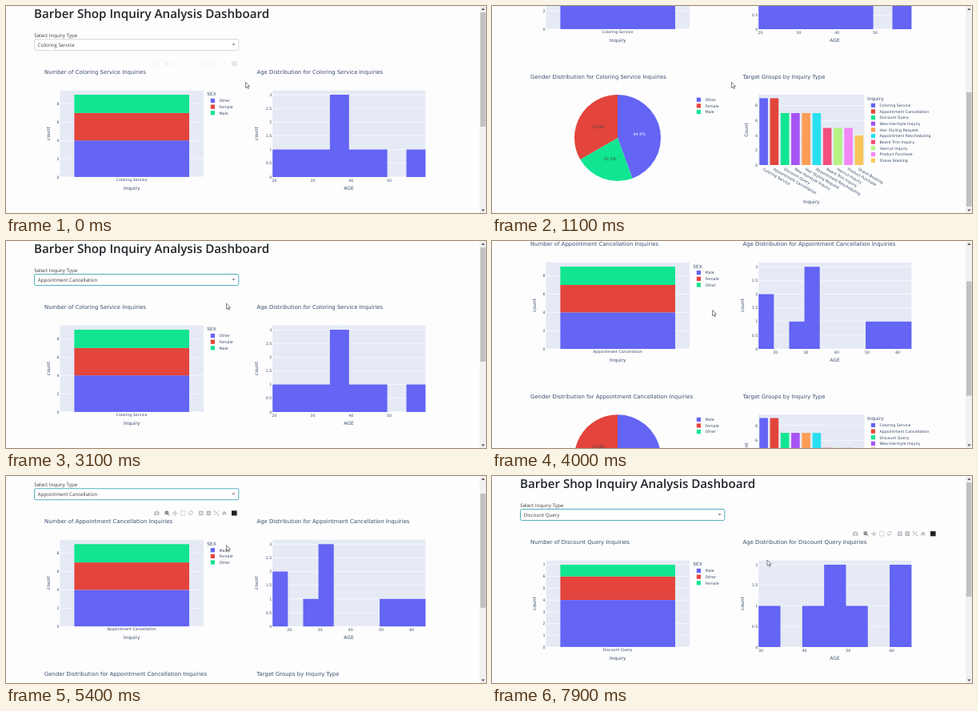
An HTML page that plays this animation: 600x259 px, repeating every 8 s.

```html
<!DOCTYPE html>
<html lang="en">
<head>
<meta charset="utf-8">
<title>Inquiry dashboard</title>
<style>
html, body { margin: 0; width: 100%; height: 100%; overflow: hidden; background: #fdfdfe; }
svg { display: block; width: 600px; height: 259px; text-rendering: geometricPrecision; }
.ui { font-family: "Open Sans", "Noto Sans", sans-serif; font-size: 6.15px; fill: #3c3c3c; }
.plot { font-family: "DejaVu Sans", sans-serif; fill: #3a4d6b; }
</style>
</head>
<body>
<svg id="stage" viewBox="0 0 600 259"></svg>
<script>
const LOOP = 8000;
const COLORS = ['#6464f5', '#e3443b', '#11e591', '#a553f5', '#fc9d57',
  '#29e0ef', '#f2507c', '#b5f383', '#f286f5', '#f8c657'];
const BACK = '#e5eaf5';
const TICK = 4.75, AXIS = 5.95, TITLE = 6.9;
const BOTTOM = 213.9, FULL = 102.9;

const DATA = [
  { name: 'Coloring Service', sexes: ['Other', 'Female', 'Male'], counts: [4, 3, 2], step: 2,
    bins: [1, 1, 1, 3, 1, 1, 0, 1], start: 19.5, ages: [20, 30, 40, 50] },
  { name: 'Appointment Cancellation', sexes: ['Male', 'Female', 'Other'], counts: [4, 3, 2], step: 2,
    bins: [2, 0, 1, 3, 0, 0, 0, 1, 1, 1], start: 14.5, ages: [20, 30, 40, 50, 60] },
  { name: 'Discount Query', sexes: ['Male', 'Other', 'Female'], counts: [4, 2, 1], step: 1,
    bins: [1, 0, 1, 2, 1, 0, 2], start: 29.5, ages: [30, 40, 50, 60] }
];
const GROUPS = [['Coloring Service', 9], ['Appointment Cancellation', 9], ['Discount Query', 7],
  ['New Hairstyle Inquiry', 7], ['Hair Styling Request', 7], ['Appointment Rescheduling', 7],
  ['Beard Trim Inquiry', 5], ['Haircut Inquiry', 5], ['Product Purchase', 5], ['Shave Booking', 4]];
const OPTIONS = ['Coloring Service', 'Appointment Cancellation', 'Discount Query',
  'Shave Booking', 'New Hairstyle Inquiry', 'Beard Trim Inquiry'];
const ROW = 14.1, MENU_TOP = 55.6;

const rect = (x, y, w, h, fill, more = '') =>
  `<rect x="${x}" y="${y}" width="${w}" height="${h}" fill="${fill}" ${more}/>`;
const path = (d, fill, more = '') => `<path d="${d}" fill="${fill}" ${more}/>`;
const text = (x, y, str, size, anchor = 'start', more = '') =>
  `<text x="${x}" y="${y}" font-size="${size}" text-anchor="${anchor}" ${more}>${str}</text>`;
const upright = (x, y, str) =>
  text(0, 0, str, AXIS, 'middle', `transform="translate(${x} ${y}) rotate(-90)"`);
const sum = list => list.reduce((a, b) => a + b, 0);

// Plot background with horizontal grid and value labels
function yAxis(x, w, bottom, h, top, step, unit) {
  let out = rect(x, bottom - h, w, h, BACK);
  for (let v = 0; v <= top; v += step) {
    const y = bottom - v * unit;
    out += rect(x, y - 0.3, w, 0.6, '#fff') + text(x - 1, y + 1.7, v, TICK, 'end');
  }
  return out;
}

function legend(x, y, labels, pitch = 7.65) {
  return labels.map((label, i) =>
    rect(x, y + i * pitch - 2.6, 5.2, 5.2, COLORS[i]) +
    text(x + 10.7, y + i * pitch + 1.8, label, TICK)).join('');
}

function countChart({ name, sexes, counts, step }) {
  const total = sum(counts), unit = FULL / total;
  let out = text(48, 85.2, `Number of ${name} Inquiries`, TITLE) +
    yAxis(67.5, 179.5, BOTTOM, 108.3, total, step, unit);
  let y = BOTTOM;
  counts.forEach((n, i) => {
    y -= n * unit;
    out += rect(85.4, y, 143.6, n * unit, COLORS[i]);
  });
  return out + text(157, 219.2, name, TICK, 'middle') + text(157.3, 229.6, 'Inquiry', AXIS, 'middle') +
    upright(55, 159.5, 'count') + text(251.3, 112.4, 'SEX', 5.8) + legend(255.8, 118.5, sexes);
}

function ageChart({ name, bins, start, ages }) {
  const left = 333.2, width = 191.2, w = width / bins.length;
  const peak = Math.max(...bins), unit = FULL / peak, span = bins.length * 5;
  let out = text(313.5, 85.2, `Age Distribution for ${name} Inquiries`, TITLE) +
    yAxis(left, width, BOTTOM, 108.3, peak, 0.5, unit);
  for (const age of ages) {
    out += text(left + (age - start) / span * width, 219.8, age, TICK, 'middle');
  }
  const outline = bins.map((n, i) => `V${BOTTOM - n * unit}H${left + (i + 1) * w}`).join('');
  return out + path(`M${left} ${BOTTOM}${outline}V${BOTTOM}Z`, COLORS[0]) +
    text(428.5, 229.8, 'AGE', AXIS, 'middle') + upright(315, 159.5, 'count');
}

function pieChart({ name, sexes, counts }) {
  const total = sum(counts), cx = 157, cy = 350, r = 54;
  const at = (turn, radius) => [
    cx + radius * Math.sin(turn * 2 * Math.PI), cy - radius * Math.cos(turn * 2 * Math.PI)];
  let out = text(48, 275.6, `Gender Distribution for ${name} Inquiries`, TITLE);
  let turn = 0;
  for (const i of [0, 2, 1]) {
    const part = counts[i] / total, [lx, ly] = at(turn + part / 2, 27.5);
    out += path(`M${cx} ${cy}L${at(turn, r)}A${r} ${r} 0 ${part > 0.5 ? 1 : 0} 1 ${at(turn + part, r)}Z`, COLORS[i]) +
      text(lx, ly + 1.8, (part * 100).toFixed(1) + '%', 5, 'middle', `fill="${i ? '#444' : '#fff'}"`);
    turn += part;
  }
  return out + legend(255.8, 302.2, sexes);
}

function groupChart() {
  const bottom = 384, unit = 9.29, slot = 13.25;
  let out = text(313.5, 275.6, 'Target Groups by Inquiry Type', TITLE) +
    yAxis(333, 132.5, bottom, 88, 8, 2, unit);
  GROUPS.forEach(([name, n], i) => {
    const x = 333 + i * slot;
    out += rect(x + 1.32, bottom - n * unit, 10.6, n * unit, COLORS[i]) +
      text(0, 0, name, TICK, 'start', `transform="translate(${x + 5} ${bottom + 6}) rotate(30)"`);
  });
  return out + upright(320, 340, 'Count') + text(399.3, 432, 'Inquiry', AXIS, 'middle') +
    text(469, 303.2, 'Inquiry', AXIS) + legend(473.8, 309.3, GROUPS.map(g => g[0]));
}

// Chart tool icons, each drawn around its own centre
function toolbar(id, x) {
  const gray = '#b9bcc2', dark = '#6b6f76';
  const line = d => path(d, 'none', `stroke="${gray}"`);
  const icons = [
    [0, path('M-3.2 -1.8h1.6l.6 -1h2l.6 1h1.6v4.4h-6.4Z', gray) + '<circle cy=".3" r="1.3" fill="#fdfdfe"/>'],
    [13, `<circle cx="-.5" cy="-.5" r="1.9" fill="none" stroke="${dark}" stroke-width="1.1"/>` +
      path('M.9 .9L3 3M-1.5 -.5h2M-.5 -1.5v2', 'none', `stroke="${dark}"`)],
    [23, line('M-3 0h6M0 -3v6') + path('M-3.3 0l1.4 -1.3v2.6ZM3.3 0l-1.4 -1.3v2.6ZM0 -3.3l-1.3 1.4h2.6ZM0 3.3l-1.3 -1.4h2.6Z', gray)],
    [33, path('M-2.8 -2.8h5.6v5.6h-5.6Z', 'none', `stroke="${gray}" stroke-width=".8" stroke-dasharray="1.4 .5"`)],
    [42.7, line('M-2 1.2C-4 -1 -1 -3 1.2 -2.4S3 1 .4 1.2S-2 .6 -1.6 2.8')],
    [55.5, rect(-2.8, -2.8, 5.6, 5.6, gray) + path('M-1.6 0h3.2M0 -1.6v3.2', 'none', 'stroke="#fdfdfe" stroke-width=".9"')],
    [65, rect(-2.8, -2.8, 5.6, 5.6, gray) + path('M-1.6 0h3.2', 'none', 'stroke="#fdfdfe" stroke-width=".9"')],
    [74.7, line('M-2.6 -2.6L2.6 2.6M2.6 -2.6L-2.6 2.6M-2.8 -1.4v-1.4h1.4M2.8 1.4v1.4h-1.4')],
    [84.5, path('M-3.2 .2L0 -2.8L3.2 .2H2.2V2.6H.7V.8H-.7V2.6H-2.2V.2Z', gray)],
    [97, rect(-3.3, -3.1, 6.6, 6.2, '#222')]
  ];
  return `<g id="${id}">` + icons.map(([dx, shape]) =>
    `<g transform="translate(${x + dx} 72.2)">${shape}</g>`).join('') + '</g>';
}

function menu() {
  return '<g id="menu" class="ui">' + rect(35.5, 55.5, 255, 80.5, '#fff', 'stroke="#ccc" stroke-width=".8"') +
    rect(36, 0, 246, ROW, '#e5f0fb', 'id="hover"') +
    '<g clip-path="url(#menuClip)">' + OPTIONS.map((name, i) =>
      `<text class="option" x="39" y="${MENU_TOP + i * ROW + 9.7}">${name}</text>`).join('') + '</g>' +
    rect(282, 56, 8.3, 79.6, '#f1f1f1') + rect(283, 64, 6.5, 36.5, '#c1c1c1') +
    path('M284.2 61.3l2 -2.2l2 2.2Z', '#505050') + path('M284.2 130.3l2 2.2l2 -2.2Z', '#505050') + '</g>';
}

const stage = document.getElementById('stage');
stage.innerHTML =
  '<defs><clipPath id="menuClip"><rect x="36" y="56" width="246" height="79.6"/></clipPath></defs>' +
  rect(0, 0, 600, 259, '#fdfdfe') +
  '<g id="page">' +
    '<g class="ui"><text x="35" y="15.2" style="font-size:15.15px;font-weight:600;fill:#212529">Barber Shop Inquiry Analysis Dashboard</text>' +
    '<text x="35.3" y="38.6">Select Inquiry Type</text>' +
    rect(35.5, 41.5, 255.3, 14, '#fff', 'id="box" rx="1.8"') +
    '<text id="value" x="39.8" y="50.8"></text>' + path('M-2.2 -1.1h4.4l-2.2 2.2Z', '#888', 'id="caret"') + '</g>' +
    '<g class="plot">' + DATA.map(d =>
      `<g class="view">${countChart(d)}${ageChart(d)}${pieChart(d)}</g>`).join('') + groupChart() + '</g>' +
    toolbar('tools1', 188.3) + toolbar('tools2', 454.3) + menu() +
  '</g>' +
  rect(592, 0, 8, 259, '#f1f1f1') + rect(593, 8, 6.6, 143, '#c1c1c1', 'id="thumb"') +
  path('M594.2 5l2.2 -2.4l2.2 2.4Z', '#505050') + path('M594.2 254.6l2.2 2.4l2.2 -2.4Z', '#505050') +
  path('M0 0V7.2L1.7 5.7L2.8 8.3L4 7.8L2.9 5.3H5.1Z', '#fff', 'id="arrow" stroke="#333" stroke-width=".6" stroke-linejoin="round"') +
  path('M-.9 0Q0 -1 .9 0V3.2L4 4Q4.7 4.3 4.5 5.4L3.8 8.6H-1L-3.2 5.2Q-3 4 -.9 5.3Z', '#fff',
    'id="hand" stroke="#333" stroke-width=".6" stroke-linejoin="round"');

const $ = id => document.getElementById(id);
const views = document.querySelectorAll('.view');
const options = document.querySelectorAll('.option');
const show = (el, on) => { el.style.display = on ? '' : 'none'; };

const SCROLL = [[0, 0], [300, 0], [800, 185], [1200, 185], [1500, 0], [3600, 0], [4000, 78.5],
  [4300, 185], [5000, 185], [5200, 78], [5400, 26], [5500, 0]];
const CURSOR = [[0, 299.5, 95.2], [1700, 299.5, 95.2], [2000, 275.5, 51.3], [2600, 275.5, 51.3],
  [2850, 275.5, 78], [3100, 275.5, 78], [3300, 275.5, 86.5], [5500, 275.5, 86.5], [5850, 262, 49],
  [6200, 262, 49], [6700, 239.5, 85.4], [7150, 239.5, 85.4], [7700, 344, 105]];
const TOOLS1 = [[0, 0.1], [200, 0], [3200, 0], [3400, 1], [5550, 1], [5800, 0]];
const TOOLS2 = [[7500, 0], [7800, 1]];

// Value of a keyed track at time t
function track(keys, t) {
  const next = keys.findIndex(k => k[0] > t);
  if (next === 0) return keys[0].slice(1);
  if (next < 0) return keys[keys.length - 1].slice(1);
  const a = keys[next - 1], b = keys[next], p = (t - a[0]) / (b[0] - a[0]);
  return a.slice(1).map((v, i) => v + (b[i + 1] - v) * p);
}

function draw(t) {
  const [scroll] = track(SCROLL, t), [x, y] = track(CURSOR, t);
  const open = (t >= 2600 && t < 3050) || (t >= 5950 && t < 7150);
  const chosen = t < 3050 ? 0 : t < 7150 ? 1 : 2;
  const charted = t < 3200 ? 0 : t < 7300 ? 1 : 2;
  const onMenu = open && y > MENU_TOP;

  $('page').setAttribute('transform', `translate(0 ${-scroll})`);
  $('thumb').setAttribute('y', 8 + scroll * 0.54);
  views.forEach((v, i) => show(v, i === charted));
  $('value').textContent = OPTIONS[chosen];
  $('box').setAttribute('stroke', chosen && !open ? '#55aebd' : '#d0d0d0');
  $('box').setAttribute('stroke-width', chosen && !open ? 1 : 0.8);
  $('caret').setAttribute('transform', `translate(284.5 48.4) scale(1 ${open ? -1 : 1})`);

  show($('menu'), open);
  const focus = onMenu ? Math.floor((y - MENU_TOP) / ROW) : chosen;
  $('hover').setAttribute('y', MENU_TOP + focus * ROW);
  options.forEach((o, i) => { o.style.fontWeight = i === chosen ? 700 : 400; });

  $('tools1').setAttribute('opacity', track(TOOLS1, t)[0]);
  $('tools2').setAttribute('opacity', track(TOOLS2, t)[0]);
  show($('arrow'), !onMenu);
  show($('hand'), onMenu);
  for (const id of ['arrow', 'hand']) $(id).setAttribute('transform', `translate(${x} ${y})`);
}

const begin = performance.now();
function tick() {
  draw((performance.now() - begin) % LOOP);
  requestAnimationFrame(tick);
}
tick();
</script>
</body>
</html>
```
